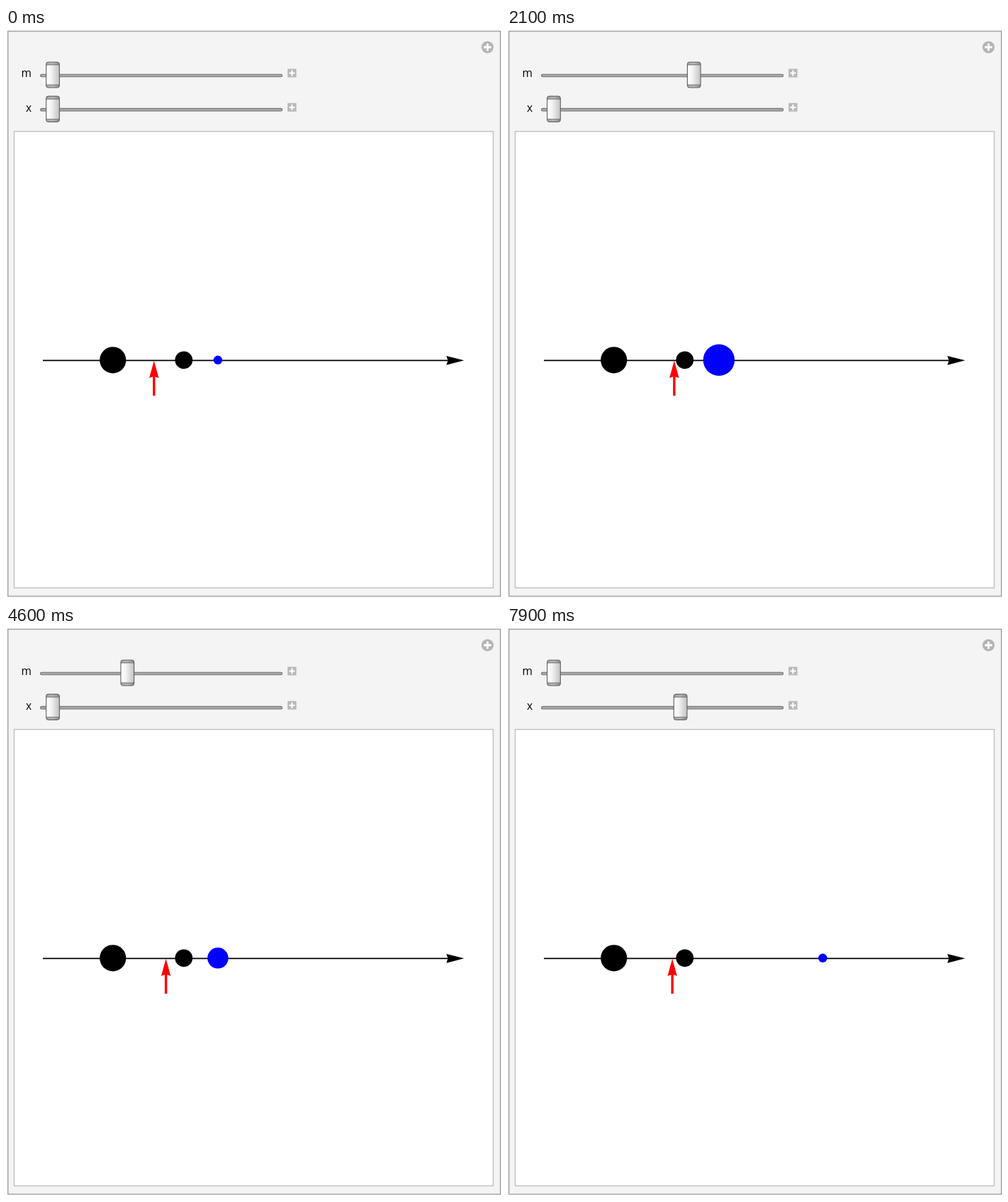
An HTML page that plays this animation: 698x803 px, repeating every 8 s.

```html
<!DOCTYPE html>
<html lang="en">
<head>
<meta charset="utf-8">
<title>Center of mass</title>
<style>
  html, body { margin: 0; width: 100%; height: 100%; overflow: hidden; background: #fff; }
  svg { display: block; }
  text { font: 15.5px "Open Sans", "Noto Sans", sans-serif; text-anchor: end; }
</style>
</head>
<body>
<svg width="698" height="803" viewBox="0 0 698 803">
  <defs>
    <linearGradient id="face">
      <stop offset="0" stop-color="#fff"/>
      <stop offset=".35" stop-color="#f4f4f4"/>
      <stop offset="1" stop-color="#c4c4c4"/>
    </linearGradient>
    <linearGradient id="cap">
      <stop offset="0" stop-color="#aaa"/>
      <stop offset=".5" stop-color="#b8b8b8"/>
      <stop offset="1" stop-color="#8c8c8c"/>
    </linearGradient>
    <g id="track">
      <rect x="48.5" y="-1.8" width="341" height="3.6" rx="1.8" fill="#a9a9a9" stroke="#747474" stroke-width="1.1"/>
      <rect x="397" y="-9.5" width="12.5" height="12" fill="#b9b9b9"/>
      <path d="M399.3-3.5h8M403.3-7.5v8" stroke="#fff" stroke-width="2"/>
    </g>
    <g id="knob">
      <rect x="-9.3" y="-18" width="18.6" height="36" rx="3.5" fill="url(#cap)" stroke="#626262" stroke-width="1.2"/>
      <rect x="-8.7" y="-13.7" width="17.4" height="27.4" rx="1.5" fill="url(#face)"/>
      <path d="M-8.5-14.2h17M-8.5 14.2h17" stroke="#777" stroke-width="1"/>
    </g>
  </defs>

  <rect x="2.7" y="4.5" width="694.6" height="796" fill="#f4f4f4" stroke="#a3a3a3" stroke-width="1.5"/>
  <rect x="11.5" y="145.7" width="675.5" height="643" fill="#fff" stroke="#bdbdbd" stroke-width="1.3"/>
  <circle cx="679" cy="27" r="8.6" fill="#b4b4b4"/>
  <path d="M673.8 27h10.4M679 21.8v10.4" stroke="#fff" stroke-width="2.8"/>

  <text x="36" y="69.3">m</text>
  <text x="36" y="117.5">x</text>
  <use href="#track" y="67"/>
  <use href="#track" y="115.2"/>
  <use href="#knob" id="massKnob"/>
  <use href="#knob" id="posKnob"/>

  <path d="M52 468.3H625" stroke="#000" stroke-width="1.8"/>
  <path d="M646 468.3L621 461.9L623.2 468.3L621 474.8Z"/>
  <circle cx="150.7" cy="467.8" r="18.6"/>
  <circle cx="250.7" cy="467.8" r="12.4"/>
  <circle id="ball" cy="467.8" fill="#00f"/>
  <g id="pointer" fill="#f00">
    <path d="M0 489V518" stroke="#f00" stroke-width="3.4"/>
    <path d="M0 468.7L-6.7 493L0 490.8L6.7 493Z"/>
  </g>
</svg>
<script>
  const LOOP = 8000, TICK = 100, SPEED = 0.1224; // knob speed in px per ms
  const KNOB_START = 66, KNOB_RANGE = 306;
  const el = id => document.getElementById(id);
  const massKnob = el('massKnob'), posKnob = el('posKnob');
  const ball = el('ball'), pointer = el('pointer');
  const move = (node, x, y) => node.setAttribute('transform', `translate(${x} ${y})`);

  function draw(time) {
    const t = Math.floor((time % LOOP) / TICK) * TICK;
    const massShift = Math.max(0, SPEED * Math.min(t - 485, 5460 - t));
    const posShift = Math.max(0, SPEED * (t - 6441));
    const mass = 1 + 4 * massShift / KNOB_RANGE;
    const x = 298.8 + 0.82 * posShift;
    const center = (3 * 150.7 + 2 * 250.7 + mass * x) / (5 + mass);

    move(massKnob, KNOB_START + massShift, 66);
    move(posKnob, KNOB_START + posShift, 114.2);
    ball.setAttribute('cx', x);
    ball.setAttribute('r', 6.2 * mass);
    move(pointer, center, 0);
  }

  let start;
  function loop(now) {
    start ??= now;
    draw(now - start);
    requestAnimationFrame(loop);
  }
  draw(0);
  requestAnimationFrame(loop);
</script>
</body>
</html>
```
